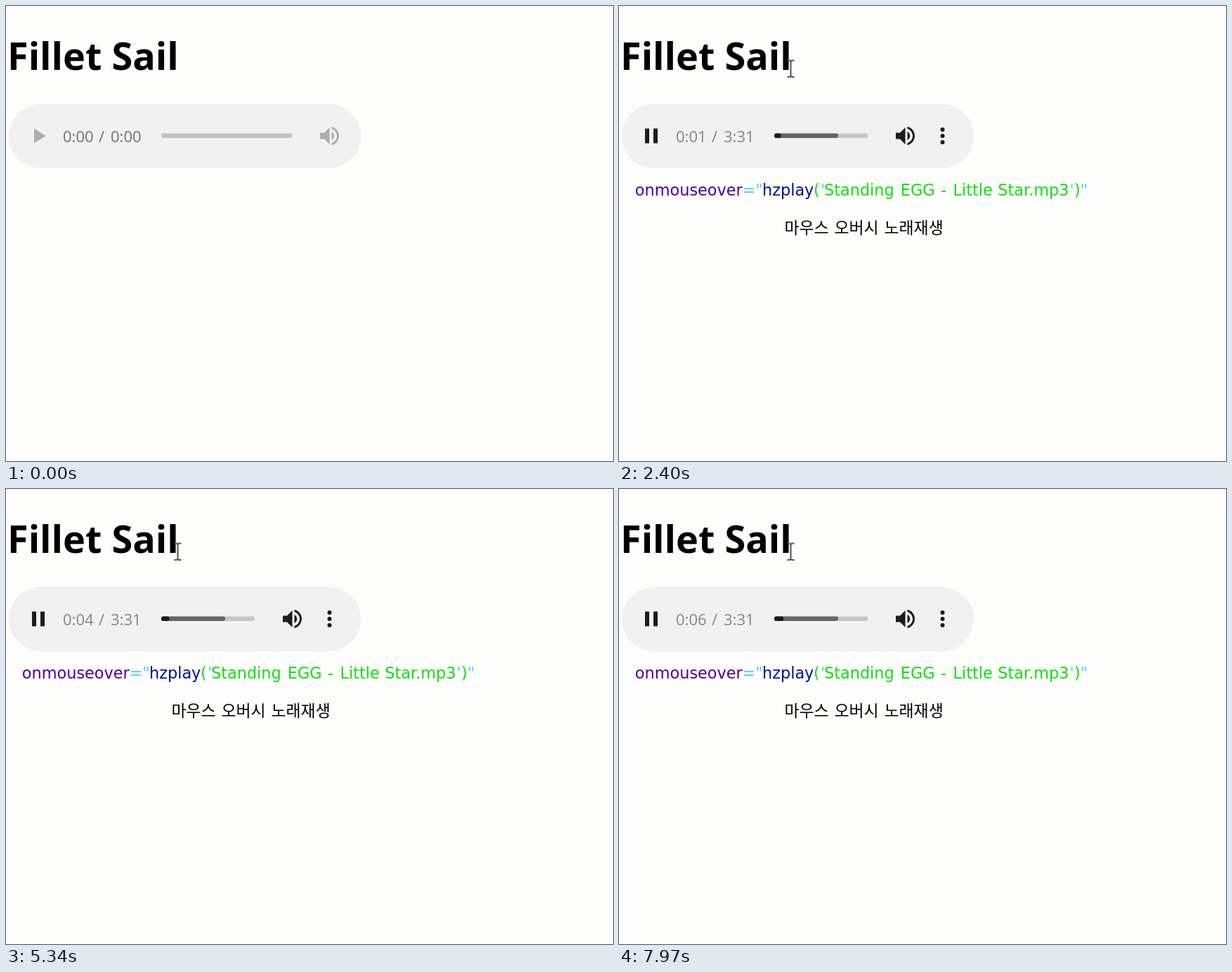
An HTML page that plays this animation: 864 px wide and 648 px high, repeating every 8 s.

```html
<!DOCTYPE html>
<html lang="ko">
<head>
<meta charset="utf-8">
<title>Audio on hover</title>
<style>
  html, body { margin: 0; width: 100%; height: 100%; overflow: hidden; background: #fdfdfb; }
  svg { display: block; width: 864px; height: 648px; }
  text { white-space: pre; }
  .page { filter: blur(.5px); }
  .title { font: 700 54px "Open Sans", sans-serif; }
  .time { font: 400 22px "Open Sans", sans-serif; }
  .code { font: 400 22.4px "DejaVu Sans", sans-serif; }
  .note { font: 300 22.9px "Noto Sans CJK KR", "Noto Sans CJK", sans-serif; word-spacing: 1.4px; }
  .name { fill: #4a00a8; }
  .mark { fill: #4fd3ee; }
  .call { fill: #00109c; }
  .string { fill: #12de12; }
</style>
</head>
<body>
<svg viewBox="0 0 864 648">
  <defs>
    <path id="speaker" d="M3 9v6h4l5 5V4L7 9H3zm13.5 3c0-1.77-1.02-3.29-2.5-4.03v8.05c1.48-.73 2.5-2.25 2.5-4.02zM14 3.23v2.06c2.89.86 5 3.54 5 6.71s-2.11 5.85-5 6.71v2.06c4.01-.91 7-4.49 7-8.77s-2.99-7.86-7-8.77z"/>
  </defs>

  <g class="page">
    <text class="title" x="2" y="91">Fillet Sail</text>
    <rect x="4" y="139.5" width="501" height="91.5" rx="45.75" fill="#f0f1f0"/>
    <text id="time" class="time" y="194">
      <tspan id="elapsed" x="81">0:00</tspan><tspan x="132">/</tspan><tspan id="total" x="149">0:00</tspan>
    </text>

    <g id="idle" fill="#adadad">
      <path transform="translate(28 167) scale(1.5)" d="M8 5v14l11-7z"/>
      <rect x="221" y="181.5" width="186" height="6.5" rx="3" fill="#c0c0c0"/>
      <use href="#speaker" transform="translate(442.5 167) scale(1.5)"/>
    </g>

    <g id="playing" fill="#1c1c1c">
      <path transform="translate(28 167) scale(1.5)" d="M6 19h4V5H6zM14 5v14h4V5z"/>
      <rect x="221" y="181.5" width="133" height="6.5" rx="3" fill="#c6c6c6"/>
      <rect x="221" y="181.5" width="91" height="6.5" rx="3" fill="#666"/>
      <rect id="progress" x="221" y="181.5" height="6.5" rx="3"/>
      <use href="#speaker" transform="translate(389.5 167) scale(1.5)"/>
      <circle cx="460.5" cy="176" r="3"/>
      <circle cx="460.5" cy="185" r="3"/>
      <circle cx="460.5" cy="194" r="3"/>
    </g>

    <path id="arrow" d="M0 .5V24.5L5.5 19.5L9.5 28.5L13.5 26.8L9.7 18.2H18Z" fill="#fff" stroke="#555" stroke-width="1.6" stroke-linejoin="round"/>
    <path id="beam" d="M239.5 77.5H243L244.5 79L246 77.5H249.5M244.5 79V99.5M239.5 101H243L244.5 99.5L246 101H249.5" fill="none" stroke="#555" stroke-width="2"/>
  </g>

  <g id="caption">
    <text class="code" y="270"><tspan class="name" x="22.8">onmouseover</tspan><tspan class="mark" x="175.5">="</tspan><tspan class="call" x="204">hzplay</tspan><tspan class="string" x="277">(</tspan><tspan class="mark" x="287">'</tspan><tspan class="string"><tspan x="292">Standing </tspan><tspan x="400.8">EGG </tspan><tspan x="458">- </tspan><tspan x="475.5">Little </tspan><tspan x="539.3">Star.mp3</tspan></tspan><tspan class="mark" x="641.5">'</tspan><tspan class="string" x="648">)</tspan><tspan class="mark" x="657">"</tspan></text>
    <text class="note" x="235.5" y="323.5">마우스 오버시 노래재생</text>
  </g>
</svg>

<script>
  const LOOP = 8000, HOVER = 1290, START = 1310, DURATION = 211;
  // Pointer tip: time, x, y
  const route = [[700, 880, 165], [830, 770, 145], [1030, 529, 104], [HOVER, 244, 88]];
  const get = id => document.getElementById(id);
  const show = (id, on) => get(id).setAttribute('visibility', on ? 'visible' : 'hidden');

  function pointerAt(t) {
    const next = Math.max(1, route.findIndex(([time]) => time >= t));
    const [t0, x0, y0] = route[next - 1], [t1, x1, y1] = route[next];
    const k = (t - t0) / (t1 - t0);
    return [x0 + (x1 - x0) * k, y0 + (y1 - y0) * k];
  }

  function draw(t) {
    const playing = t >= START;
    const seconds = playing ? (t - START) / 1000 : 0;
    const moving = t >= route[0][0] && t < HOVER;

    show('idle', !playing);
    show('playing', playing);
    show('caption', playing);
    show('arrow', moving);
    show('beam', t >= HOVER);
    if (moving) get('arrow').setAttribute('transform', `translate(${pointerAt(t)})`);

    get('elapsed').textContent = '0:0' + Math.floor(seconds);
    get('total').textContent = playing ? '3:31' : '0:00';
    get('time').setAttribute('fill', playing ? '#858585' : '#707070');
    get('progress').setAttribute('width', 9 + 133 * seconds / DURATION);
  }

  const begin = performance.now();
  function frame() {
    draw((performance.now() - begin) % LOOP);
    requestAnimationFrame(frame);
  }
  frame();
</script>
</body>
</html>
```
